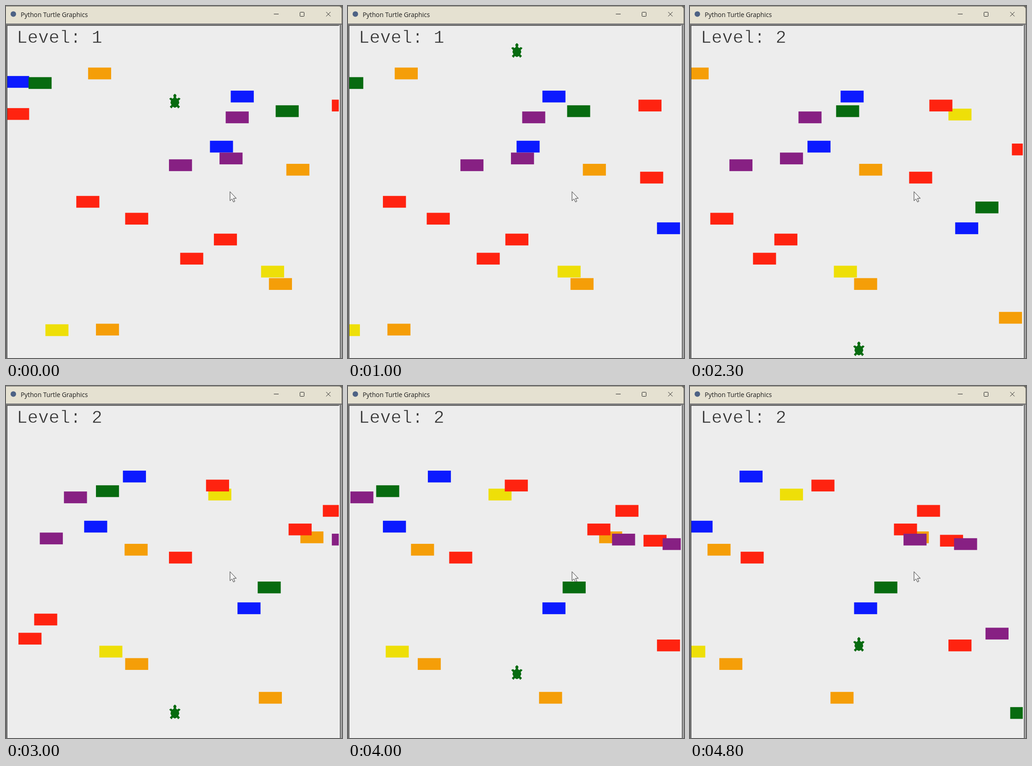
Recreate the animation shown at these times as an HTML page with a canvas. Size 732 by 765 pixels, loop 4.9 s.

```html
<!DOCTYPE html>
<html lang="en">
<head>
<meta charset="utf-8">
<title>Python Turtle Graphics</title>
<style>
  html, body { margin: 0; width: 100%; height: 100%; overflow: hidden; background: #ededed; }
  canvas, svg { position: absolute; left: 0; top: 0; width: 732px; height: 765px; }
  .title { font: 13.8px "Open Sans", "Noto Sans", sans-serif; fill: #1c1c1c; }
  .level { font: 38.8px "Liberation Mono", "Courier New", monospace; fill: #333; stroke: #ededed; stroke-width: .7; white-space: pre; }
  .icons { fill: none; stroke: #222; stroke-width: 1; }
</style>
</head>
<body>
<canvas id="stage" width="732" height="765"></canvas>
<svg viewBox="0 0 732 765">
  <rect width="732" height="38" fill="#e5e1d1"/>
  <path d="M0 0H732V38H731V6Q730 1 725 1H0Z" fill="#6b6962"/>
  <circle cx="16" cy="17.5" r="6" fill="#4d6285"/>
  <text class="title" x="32" y="24">Python Turtle Graphics</text>
  <g class="icons">
    <path d="M583.5 17.5H594M697.5 13L707 22.5M707 13L697.5 22.5"/>
    <rect x="640.5" y="13.5" width="9" height="9" rx="1"/>
  </g>
  <text class="level" id="level" x="23.5" y="80">Level: 1</text>
  <path d="M488 403.5V423.3L492.4 419.3L495.6 426L498.6 424.6L495.6 418H501.8Z"
        fill="#f3f3f3" stroke="#333" stroke-width="1"/>
</svg>
<script>
const ctx = document.getElementById('stage').getContext('2d');
const levelText = document.getElementById('level');

const LOOP = 4900, STEP = 100;
const UNIT = 1.2235, CX = 367.9, CY = 407.2; // world units to pixels
const EDGE = 300;
const CAR_W = 50.2, CAR_H = 25.6;

const COLORS = {
  r: '#ff2310', o: '#f59e08', y: '#eedf08',
  g: '#076b10', b: '#0b1aff', p: '#872083'
};

// colour, tick of entry at the right edge, units per tick, height
const CARS = [
  ['y', 10, 10, 140], ['o', 24, 7, 64],
  ['b', -58, 10, 198], ['g', -90, 6, 196], ['r', -58, 10, 141],
  ['o', -62, 7, 213], ['b', -30, 6, 172], ['g', -10, 10, 146],
  ['p', -21, 9, 135], ['r', 0, 7, 156], ['b', -31, 7, 83],
  ['p', -20, 10, 62], ['p', -29, 10, 50], ['o', -9, 9, 42],
  ['r', -65, 7, -15], ['r', -46, 8, -45], ['r', -21, 10, -82],
  ['r', -30, 9, -116], ['y', -14, 9, -139], ['o', -14, 8, -161],
  ['y', -51, 10, -243], ['o', -42, 10, -242], ['r', 3, 10, 28],
  ['b', 4, 6, -62], ['g', 10, 6, -25], ['o', 19, 10, -221],
  ['r', 21, 7, 78], ['r', 30, 8, 111], ['p', 32, 10, 60],
  ['r', 37, 9, 58], ['r', 40, 10, -128], ['p', 41, 10, 52],
  ['p', 46, 9, -107], ['g', 51, 10, -248]
];

// [ms, count] keys
const TICKS = [[0, 0], [1000, 9], [1800, 17], [2300, 22], [2400, 24], [3000, 32], [4000, 43], [4800, 52]];
const CLIMB = [[0, 0], [1000, 9], [1200, 10], [1400, 12]];
const CLIMB_2 = [[2300, 0], [2400, 1], [3000, 3], [4000, 10], [4800, 15]];
const LEVEL_UP = 1500;

// right half of the turtle, mirrored for the left
const HALF = [[0, 16], [2, 14], [1, 10], [4, 7], [7, 9], [9, 8], [6, 5], [7, 1], [5, -3], [8, -6], [6, -8], [4, -5], [0, -7]];
const TURTLE = HALF.concat(HALF.slice(1, -1).reverse().map(([x, y]) => [-x, y]));

const px = x => CX + x * UNIT;
const py = y => CY - y * UNIT;

function count(keys, t) {
  if (t <= keys[0][0]) return keys[0][1];
  for (let i = 1; i < keys.length; i++) {
    const [t0, a] = keys[i - 1], [t1, b] = keys[i];
    if (t <= t1) return Math.round(a + (b - a) * (t - t0) / (t1 - t0));
  }
  return keys[keys.length - 1][1];
}

function rect(color, x, y, w, h) {
  ctx.fillStyle = color;
  ctx.fillRect(x, y, w, h);
}

function drawFrame() {
  rect('#7b7b7b', 0, 38, 732, 3.5);
  rect('#7b7b7b', 0, 38, 1.5, 727);
  rect('#444444', 1.5, 41.5, 724, 1.5);
  rect('#444444', 1.5, 41.5, 1.5, 724);
  rect('#f4f4f4', 725, 43, 2, 722);
  rect('#777777', 727, 40, 3, 725);
  rect('#dadada', 730, 41, 1, 724);
  rect('#777777', 731, 38, 1, 727);
}

function drawCars(tick) {
  ctx.save();
  ctx.beginPath();
  ctx.rect(3, 43, 722, 722);
  ctx.clip();
  for (const [color, entry, speed, y] of CARS) {
    const x = EDGE - speed * (tick - entry);
    if (tick >= entry && x >= -EDGE) {
      rect(COLORS[color], px(x) - CAR_W / 2, py(y) - CAR_H / 2, CAR_W, CAR_H);
    }
  }
  ctx.restore();
}

function drawTurtle(y) {
  ctx.beginPath();
  for (const [dx, dy] of TURTLE) ctx.lineTo(px(dx), py(y + dy));
  ctx.closePath();
  ctx.fillStyle = ctx.strokeStyle = COLORS.g;
  ctx.lineWidth = 2;
  ctx.lineJoin = 'round';
  ctx.fill();
  ctx.stroke();
}

function draw(now) {
  const t = Math.floor((now % LOOP) / STEP) * STEP;
  const second = t >= LEVEL_UP;
  rect('#ededed', 0, 0, 732, 765);
  drawFrame();
  drawCars(count(TICKS, t));
  drawTurtle(second ? -280 + 10 * count(CLIMB_2, t) : 160 + 10 * count(CLIMB, t));
  levelText.textContent = 'Level: ' + (second ? 2 : 1);
}

let start;
function loop(now) {
  start ??= now;
  draw(now - start);
  requestAnimationFrame(loop);
}
draw(0);
requestAnimationFrame(loop);
</script>
</body>
</html>
```
